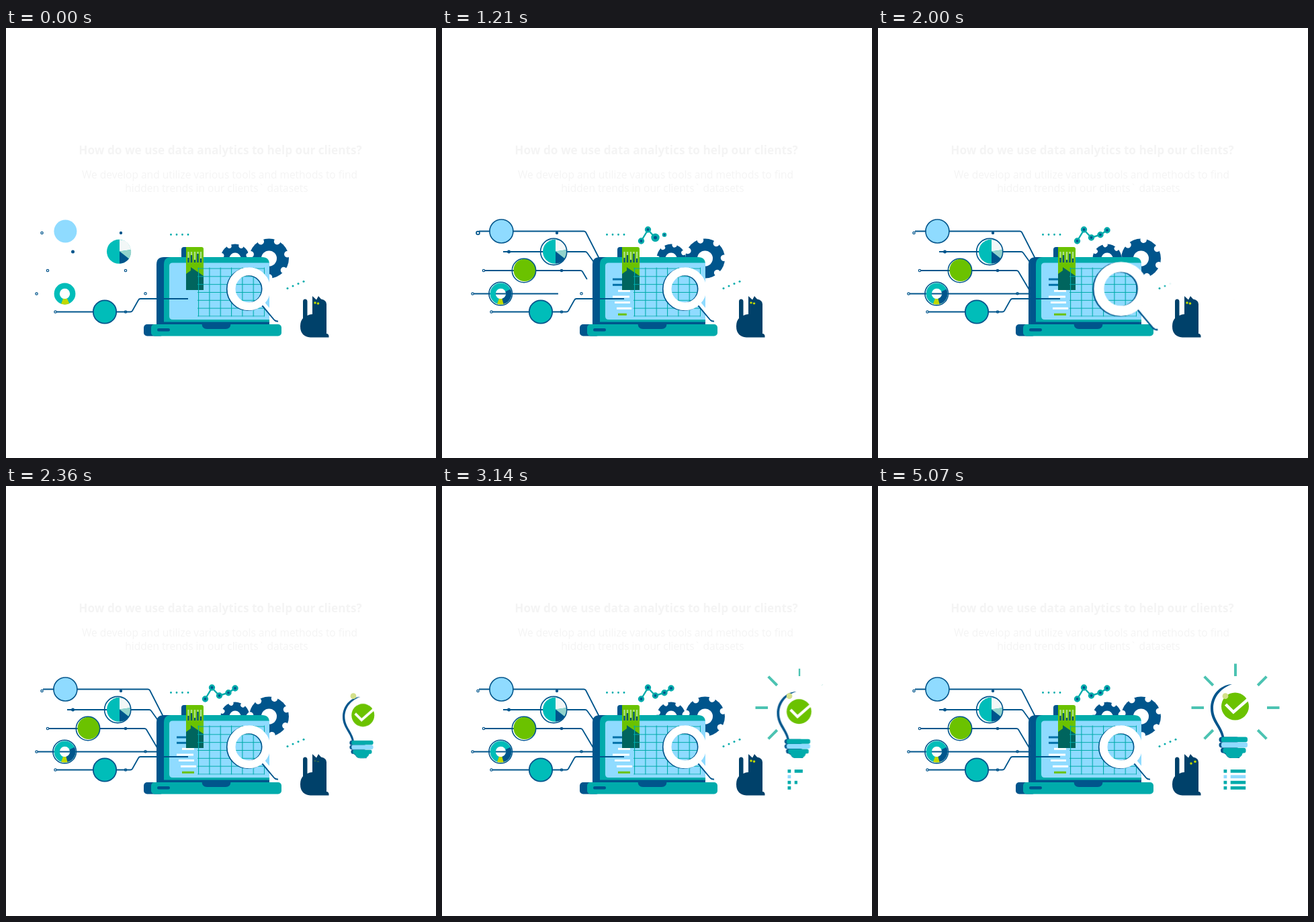
An HTML page for the animation above (6.07 s loop, 640 by 640 pixels).

```html
<!DOCTYPE html>
<html lang="en">
<head>
<meta charset="utf-8">
<title>Data analytics</title>
<style>
/* one clock in ms drives every part; --a is a part's start, --d its duration */
@property --t { syntax: "<number>"; inherits: true; initial-value: 0; }
:root {
  --navy: #00558c; --teal: #00abab; --aqua: #00bdb9; --sky: #8fdbff; --green: #6bc200; --lime: #c0d800;
  animation: clock 6070ms steps(85) infinite;
}
@keyframes clock { to { --t: 6070; } }
html, body { margin: 0; width: 100%; height: 100%; overflow: hidden; background: #fff; }
svg { display: block; width: 100vw; height: 100vh; }
text { font-family: "Open Sans", "Noto Sans", sans-serif; font-size: 15.5px; fill: #f4f4f4; text-anchor: middle; }
.title { font-size: 17.2px; font-weight: 700; }

.k { --p: clamp(0, (var(--t) - var(--a)) / var(--d, 500), 1); }
.mid { transform-box: fill-box; transform-origin: center; }
.line { fill: none; stroke: var(--navy); stroke-width: 1.8; stroke-linejoin: round; }
.draw { stroke-dasharray: 1px 2px; stroke-dashoffset: calc(1px * (1 - var(--p))); }
.ring { stroke-width: 1.6; stroke-dasharray: calc(1px * var(--p)) 2px; stroke-dashoffset: calc(1px * (var(--p) / 2 - .5)); }
.grow { transform: scale(var(--p)); }
.pop { transform: scale(min(var(--p) * 3, 1.75 - .75 * var(--p))); fill: var(--navy); stroke: var(--teal); stroke-width: 2.8; }
.pulse {
  fill: none; stroke: var(--navy); stroke-width: 1.2;
  transform: scale(calc(1 + .9 * max(0, 1 - max(var(--t) - var(--c), var(--c) - var(--t)) / 300)));
}
.swell { transform: scale(calc(1 + .36 * clamp(0, min((var(--t) - 100) / 380, (1130 - var(--t)) / 400), 1))); }
.gear { --a: 700; --d: 1870; transform: rotate(calc(var(--p) * var(--turn) - 13deg)); }
.teeth { fill: none; stroke: #fff; stroke-linecap: round; stroke-dasharray: 0 1; }
.blink { opacity: clamp(0, max(1530 - var(--t), var(--t) - var(--c)) / 100, 1); }
.row { transform-box: fill-box; transform-origin: left; transform: scaleX(calc(1 - (1 - var(--p)) * (1 - var(--p)))); }
.ray { --a: calc(2650 + 100 * var(--i)); --d: 200; transform: rotate(calc(45deg * var(--i) - 135deg)) translateY(-47px) scale(var(--p)); }
.eye {
  --a: 3450; --d: 200;
  --away: min(max(var(--t) - 1000, 1000 - var(--t)), max(var(--t) - 2330, 2330 - var(--t)), max(var(--t) - 4890, 4890 - var(--t)));
  fill: var(--lime);
  transform: translate(calc(1px * var(--p) * var(--x)), calc(1px * var(--p) * var(--y))) scaleY(clamp(0, var(--away) / 180, 1));
}
.lens { transform-origin: 361px 388.5px; animation: lens 6070ms infinite; }
@keyframes lens {
  0%, 22.4% { transform: none; }
  25.9% { transform: scale(.75); }
  28.2% { transform: scale(.89); }
  32.3% { transform: scale(1.3); }
  37.6%, 100% { transform: none; }
}
.bulb { transform-origin: 530px 405px; animation: bulb 6070ms linear infinite; }
@keyframes bulb {
  0%, 32.95% { transform: scale(0); }
  38.9% { transform: scale(.83); }
  41.2% { transform: scale(.97); }
  47.1% { transform: scale(.85); }
  51.7% { transform: scale(.9); }
  57.7%, 100% { transform: none; }
}
.navy { fill: var(--navy); } .teal { fill: var(--teal); } .aqua { fill: var(--aqua); }
.sky { fill: var(--sky); } .green { fill: var(--green); } .lime { fill: var(--lime); }
</style>
</head>
<body>
<svg viewBox="0 0 640 640">
  <defs>
    <pattern id="cell" x="286" y="357.5" width="16.33" height="11.83" patternUnits="userSpaceOnUse">
      <path d="M0 0H16.33M0 0V11.83" fill="none" stroke="#00abab" stroke-width="2.2"/>
    </pattern>
  </defs>

  <text class="title" x="319" y="188">How do we use data analytics to help our clients?</text>
  <text x="318" y="224">We develop and utilize various tools and methods to find</text>
  <text x="313.5" y="244">hidden trends in our clients` datasets</text>

  <!-- gears -->
  <circle class="navy" cx="341" cy="343" r="21.5"/>
  <circle class="teeth gear k mid" style="--turn:-48deg" cx="341" cy="343" r="20.5" stroke-width="7" pathLength="7"/>
  <circle cx="341" cy="343" r="8.5" fill="#fff"/>
  <circle class="navy" cx="391.5" cy="343" r="29.5"/>
  <circle class="teeth gear k mid" style="--turn:48deg" cx="391.5" cy="343" r="28" stroke-width="9.5" pathLength="7"/>
  <circle cx="391.5" cy="343" r="11.5" fill="#fff"/>

  <!-- laptop -->
  <path class="navy" d="M224 441V352Q224 341 235 341H260V441Z"/>
  <path class="teal" d="M235 438V352Q235 341 246 341H381Q392 341 392 352V438Z"/>
  <path class="sky" d="M243 429V354Q243 349.500 248 349.500H392V434H248Q243 434 243 429Z"/>
  <rect class="navy" x="224" y="437.500" width="168" height="3.500"/>
  <rect class="navy" x="205" y="441" width="30" height="17.500" rx="5"/>
  <rect class="teal" x="216" y="441" width="194" height="17.500" rx="5"/>
  <path class="navy" d="M291.500 440.500H334.500Q334 448 327 448H299Q292 448 291.500 440.500Z"/>
  <rect class="navy" x="225" y="447" width="19" height="4.500" rx="2.200"/>

  <!-- text on the screen -->
  <g fill="none" stroke-width="3">
    <g stroke="#0071a8">
      <path class="draw k" style="--a:700;--d:200" pathLength="1" d="M254 374H271"/>
      <path class="draw k" style="--a:750;--d:200" pathLength="1" d="M254 382.300H271"/>
    </g>
    <g stroke="#fff">
      <path class="draw k" style="--a:800;--d:200" pathLength="1" d="M262 391.300H280"/>
      <path class="draw k" style="--a:850;--d:200" pathLength="1" d="M254 400H279"/>
      <path class="draw k" style="--a:900;--d:200" pathLength="1" d="M257 408.500H280"/>
      <path class="draw k" style="--a:950;--d:200" pathLength="1" d="M260 417.300H283"/>
    </g>
    <path class="draw k" style="--a:1000;--d:200" stroke="#6bc200" pathLength="1" d="M262 426.300H280"/>
  </g>

  <!-- card -->
  <path class="navy" d="M268 341H261V330Q261 326 265 326H268Z"/>
  <path class="green" d="M268 390V326H291Q294 326 294 329V390Z"/>
  <path d="M268 366L275 361V356L294 369V390H268Z" fill="#00655e"/>
  <g fill="none" stroke-width="2.400">
    <path d="M271.500 333V349M276 333V349M281 333V349M285.500 333V349M290 333V349" stroke="#a9e08a"/>
    <path d="M271.500 342V349M276 338V349M281 345V349M285.500 336V349M290 343V349" stroke="#005566"/>
  </g>
  <rect x="285" y="356.500" width="100" height="73" fill="url(#cell)"/>

  <!-- magnifier -->
  <g class="lens" fill="none">
    <path d="M377 408L399 434Q401 437 405 436.500" stroke="#00558c" stroke-width="2"/>
    <path d="M380 406L402 432.500" stroke="#fff" stroke-width="5"/>
    <circle cx="360" cy="388.800" r="26" stroke="#00558c" stroke-width="12.300"/>
    <circle cx="361.500" cy="388.300" r="26" stroke="#fff" stroke-width="12"/>
  </g>

  <!-- connecting lines -->
  <g class="line">
    <path class="draw k" style="--a:70;--d:600" pathLength="1" d="M55 302.500H211Q213 302.500 214 304L235 345"/>
    <path class="draw k" style="--a:330;--d:600" pathLength="1" d="M91 333H213Q215 333 216 334.500L226 348.500"/>
    <path class="draw k" style="--a:280;--d:960" pathLength="1" d="M63.500 361H206Q208 361 209 362.500L225 389.500"/>
    <path class="draw k" style="--a:382;--d:1075" pathLength="1" d="M47 395.500H225"/>
    <path d="M75 422.500H185Q187 422.500 188 421L197 405Q198 403 200 403H271"/>
  </g>

  <!-- discs -->
  <circle class="sky swell mid" cx="88.400" cy="302.500" r="17"/>
  <g>
    <circle class="aqua" cx="168" cy="332.800" r="18"/>
    <path d="M169 332.500V315Q183 316 186 330Z" fill="#f2f7f7"/>
    <path d="M169 332.500L186 330Q187 338 183 343.500Z" fill="#93d3cc"/>
    <path class="navy" d="M169 332.500L183 343.500Q178 350 169 350.500Z"/>
  </g>
  <circle class="green grow k mid" style="--a:70;--d:460" cx="123" cy="360.300" r="16.600"/>
  <g fill="none" stroke-width="8.200">
    <circle cx="87.500" cy="395.500" r="11.800" stroke="#00bdb9"/>
    <path d="M92.600 406.200A11.800 11.800 0 0 1 83.500 406.600" stroke="#c0d800"/>
    <path class="draw k" style="--a:70;--d:380" d="M90.500 406.900A11.800 11.800 0 0 0 98.200 390.500" stroke="#00558c" pathLength="1"/>
  </g>
  <circle class="aqua" cx="147" cy="422.500" r="17"/>

  <g class="line">
    <circle class="ring k" style="--a:680;--d:420" pathLength="1" cx="88.400" cy="302.500" r="17.500"/>
    <circle class="ring k" style="--a:680;--d:420" pathLength="1" cx="166.200" cy="333" r="19.600"/>
    <circle class="ring k" style="--a:350" pathLength="1" cx="122" cy="361" r="17.700"/>
    <circle class="ring k" style="--a:700;--d:420" pathLength="1" cx="87.200" cy="395.500" r="17.300"/>
    <circle cx="147" cy="422.500" r="17.200"/>
  </g>

  <circle class="pulse mid" style="--c:1300" cx="53.500" cy="305" r="1.700"/>
  <circle class="pulse mid" style="--c:550" cx="178" cy="361" r="1.700"/>
  <circle class="pulse mid" style="--c:500" cx="45.500" cy="395.500" r="1.700"/>
  <circle class="pulse mid" style="--c:680" cx="207.500" cy="395.300" r="1.700"/>
  <circle class="pulse mid" style="--c:470" cx="178" cy="422.500" r="1.700"/>
  <circle class="pulse mid" style="--c:-400" cx="62" cy="361" r="1.700"/>
  <circle class="pulse mid" style="--c:-400" cx="73.500" cy="422.500" r="1.700"/>
  <circle class="navy" cx="171" cy="305" r="2.200"/>
  <circle class="navy" cx="99.500" cy="333" r="2.500"/>

  <!-- chart -->
  <path d="M245.500 307.500H272" fill="none" stroke="#00abab" stroke-width="2.800" stroke-linecap="round" stroke-dasharray="0 8.500"/>
  <g fill="none" stroke="#00abab" stroke-width="2.400">
    <path class="draw k" style="--a:650;--d:200" pathLength="1" d="M296.500 317L306.500 300.500"/>
    <path class="draw k" style="--a:900;--d:200" pathLength="1" d="M306.500 300.500L317.500 312"/>
    <path class="draw k" style="--a:1230;--d:200" pathLength="1" d="M317.500 312L331 307.700"/>
    <path class="draw k" style="--a:1400;--d:200" pathLength="1" d="M331 307.700L341 301"/>
  </g>
  <g style="--d:700">
    <circle class="pop k mid" style="--a:170" cx="296.500" cy="317" r="3.300"/>
    <circle class="pop k mid" style="--a:210" cx="306.500" cy="300" r="3.300"/>
    <circle class="pop k mid" style="--a:740" cx="317.500" cy="312" r="3.300"/>
    <circle class="pop k mid" style="--a:980" cx="331" cy="307.700" r="3.300"/>
    <circle class="pop k mid" style="--a:1185" cx="341" cy="301" r="3.300"/>
  </g>

  <g class="teal">
    <circle class="blink" style="--c:1850" cx="419" cy="387.500" r="1.500"/>
    <circle class="blink" style="--c:1920" cx="427" cy="384" r="1.500"/>
    <circle class="blink" style="--c:1990" cx="435" cy="380.600" r="1.500"/>
    <circle class="blink" style="--c:2060" cx="443" cy="377.300" r="1.500"/>
  </g>

  <!-- cat -->
  <path d="M442 407Q442 403.500 445.200 403.500T448.500 407V428Q452 426 456 426V399L462 404.500L465 399L469 403.500Q477 405 477 411V455Q481 455 480.500 460.500H453Q438 459 438 444Q438 436 442 432Z" fill="#00416a"/>
  <circle class="eye k mid" style="--x:6;--y:4" cx="460" cy="409" r="1.800"/>
  <circle class="eye k mid" style="--x:7.500;--y:.2" cx="464.500" cy="410" r="1.800"/>

  <!-- bulb -->
  <g class="bulb">
    <path class="navy" d="M512.500 379C511 360 495 352 495 331C495 312 508 296 527 295C512 300 499 313 499 331C499 350 515 359 516 379Z"/>
    <g class="navy">
      <rect x="507.500" y="373.500" width="30" height="8" rx="4"/>
      <rect x="507.500" y="381.500" width="30" height="8" rx="4"/>
      <rect x="510" y="389.500" width="28" height="8" rx="4"/>
      <path d="M514 397H538V405H526Q520 405 518 400Z"/>
    </g>
    <rect class="teal" x="511" y="373.500" width="39" height="7.800" rx="3"/>
    <rect class="sky" x="511" y="381.500" width="39" height="7.800" rx="3"/>
    <rect class="teal" x="513.500" y="389.800" width="34" height="7.700" rx="3"/>
    <path class="teal" d="M517 397H543Q541 405 533 405H527Q519 405 517 397Z"/>
    <circle class="green" cx="531.500" cy="328" r="20.500"/>
    <path d="M517.500 325L529 336.500L553 315.500" fill="none" stroke="#fff" stroke-width="4.500"/>
  </g>
  <circle class="grow k mid" style="--a:2150;--d:150" cx="517" cy="312.700" r="4.400" fill="#d3e08a"/>

  <g transform="translate(532 330)" fill="none" stroke="#4cc3b2" stroke-width="4">
    <path class="ray k" style="--i:0" d="M0 0V-18.500"/>
    <path class="ray k" style="--i:1" d="M0 0V-18.500"/>
    <path class="ray k" style="--i:2" d="M0 0V-18.500"/>
    <path class="ray k" style="--i:3" d="M0 0V-18.500"/>
    <path class="ray k" style="--i:4" d="M0 0V-18.500"/>
    <path class="ray k" style="--i:5" d="M0 0V-18.500"/>
    <path class="ray k" style="--i:6" d="M0 0V-18.500"/>
  </g>

  <!-- list -->
  <g style="--d:150">
    <rect class="teal grow k mid" style="--a:2640" x="514.500" y="422" width="4.800" height="4.800"/>
    <rect class="sky grow k mid" style="--a:2700" x="514.500" y="430.300" width="4.800" height="4.800"/>
    <rect class="teal grow k mid" style="--a:2760" x="514.500" y="438.800" width="4.800" height="4.800"/>
    <rect class="teal grow k mid" style="--a:2820" x="514.500" y="447" width="4.800" height="4.800"/>
  </g>
  <rect class="teal row k" style="--a:2780;--d:900" x="524.700" y="422" width="22.500" height="4.800"/>
  <rect class="sky row k" style="--a:3095;--d:900" x="524.700" y="430.300" width="22.500" height="4.800"/>
  <rect class="teal row k" style="--a:2960;--d:1110" x="524.700" y="438.800" width="22.500" height="4.800"/>
  <rect class="teal row k" style="--a:3110;--d:1100" x="524.700" y="447" width="22.500" height="4.800"/>
</svg>
</body>
</html>
```
